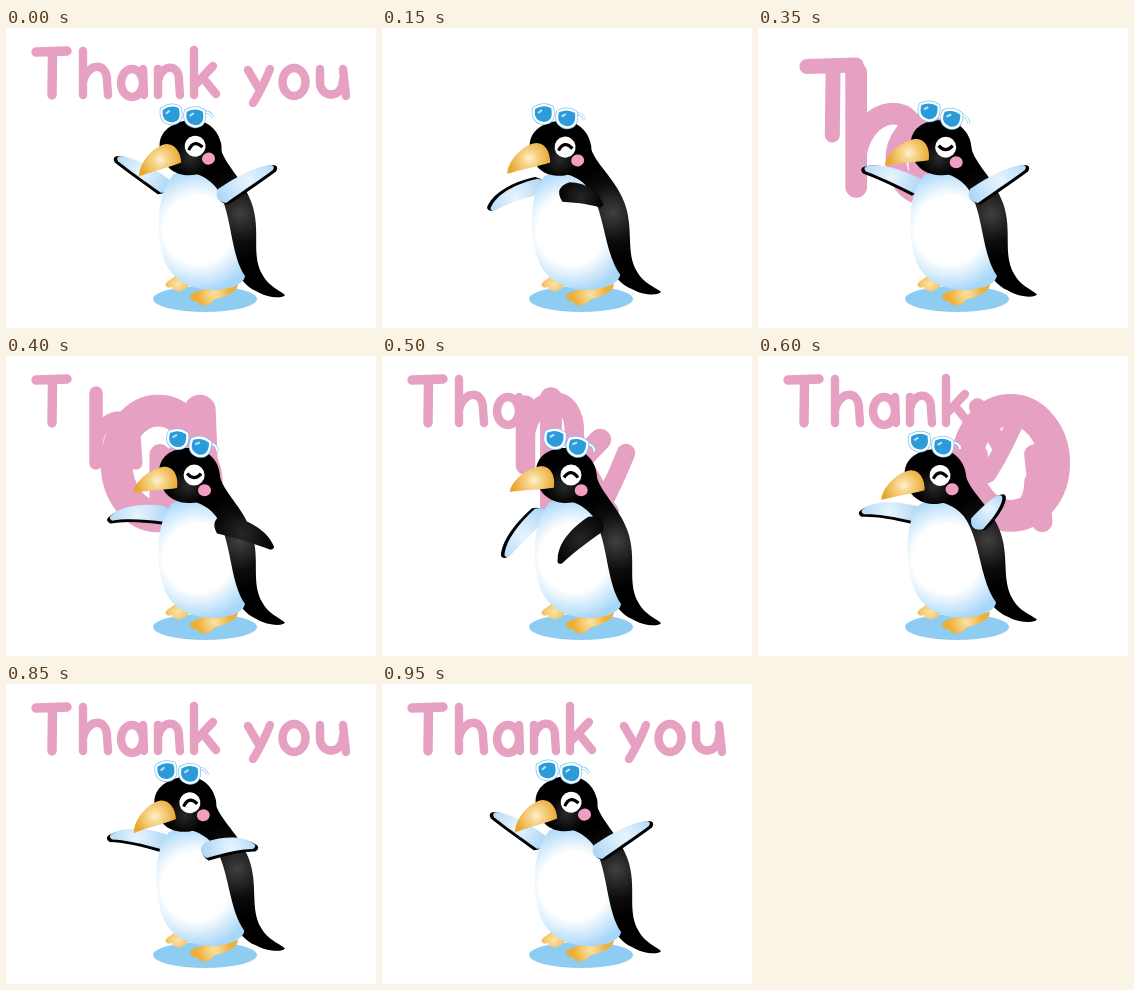
These frames come from a looping animation (370x300 px, 1000 ms). An HTML page with a canvas:

```html
<!DOCTYPE html>
<html lang="en">
<head>
<meta charset="utf-8">
<title>Thank you</title>
<style>
html, body { margin: 0; width: 100%; height: 100%; overflow: hidden; background: #fff; }
canvas { display: block; }
</style>
</head>
<body>
<canvas width="370" height="300" role="img" aria-label="Thank you"></canvas>
<script>
const c = document.querySelector('canvas').getContext('2d');
const PINK = '#e5a0c2', BLACK = '#000';

// Hand-lettered strokes: path, centre x, centre y, height
const letters = [
  ['M30 24L61 23M46.5 24L46 67', 46, 45, 54],
  ['M77 23V67M77 54C80 36 101 32 101 53L102 67', 89, 45, 54],
  ['M137 55A11 14 0 1 1 115 55A11 14 0 1 1 137 55M137 41L138 67', 126, 55, 37],
  ['M152 41V67M152 53C155 36 174 34 173 54L174 67', 163, 54, 37],
  ['M188 22V67M207 38L190 56M197 50L210 66', 199, 45, 54],
  ['M242 42L253 61M264 41Q256 61 247 75', 253, 57, 42],
  ['M299.5 54A11.5 14 0 1 1 276.5 54A11.5 14 0 1 1 299.5 54', 288, 54, 37],
  ['M314 41V54C314 71 337 71 337 52M337 41L340 68', 327, 54, 37]
].map(([d, ...box]) => [new Path2D(d), ...box]);

// Letter flight: height, then the share of the way back towards the penguin
const flight = [[92, .57, .61], [140, .38, .42], [86, .19, .2]];

// Pose keys: frame, body tilt, head tilt, left wing angle, right wing x, y, angle, length
const poses = [
  [0, 0, -12, -31, 216, 168, -30, 60],
  [3, -2.3, -6, 25, 184, 164, 20, 40],
  [7, -.5, .5, -19, 216, 168, -30, 60],
  [10, 0, 1, 50, 214, 168, 134, 55],
  [12, -2.7, -3.5, -3, 219, 168, -49, 38],
  [15, -4, -8, 19, 184, 164, 20, 40],
  [19, 0, -12, -31, 216, 168, -30, 60]
];

function poseAt(f) {
  const i = Math.max(1, poses.findIndex(p => p[0] >= f));
  const a = poses[i - 1], b = poses[i], t = (f - a[0]) / (b[0] - a[0]);
  return a.map((v, k) => v + (b[k] - v) * t).slice(1);
}

function glow(x, y, r, ...stops) {
  const g = c.createRadialGradient(x, y, 0, x, y, r);
  stops.forEach(([at, col]) => g.addColorStop(at, col));
  return g;
}

function fill(d, style) {
  c.fillStyle = style;
  c.fill(new Path2D(d));
}

function line(d, style, width) {
  c.strokeStyle = style;
  c.lineWidth = width;
  c.stroke(new Path2D(d));
}

function oval(x, y, rx, ry, style) {
  c.beginPath();
  c.ellipse(x, y, rx, ry, 0, 0, 7);
  c.fillStyle = style;
  c.fill();
}

function group(draw) {
  c.save();
  draw();
  c.restore();
}

function turn(x, y, deg) {
  c.translate(x, y);
  c.rotate(deg * Math.PI / 180);
  c.translate(-x, -y);
}

function drawText(f) {
  letters.forEach(([path, x, y, h], i) => {
    const n = f === 0 ? flight.length : f - 5 - i;
    if (n < 0) return;
    const [size, u, v] = flight[n] || [h, 0, 0];
    group(() => {
      c.translate(x + (195 - x) * u, y + (180 - y) * v);
      c.scale(size / h, size / h);
      c.translate(-x, -y);
      c.lineCap = 'round';
      c.strokeStyle = PINK;
      c.lineWidth = i ? 8.4 : 9.4;
      c.stroke(path);
    });
  });
}

function wing(x, y, deg, len, flip, dark) {
  const w = dark ? 10.5 : 8, tip = len - 3;
  const b = -5 * Math.cos((deg - 15) * Math.PI / 120); // arched most when level
  const blade = `M0 ${-w}C${len * .4} ${b - w} ${len * .75} ${b - w * .8} ${tip} -3Q${len + 2} 0 ${tip} 3` +
    `C${len * .75} ${b + w * .8} ${len * .4} ${b + w} 0 ${w}Q${-w * 1.3} 0 0 ${-w}`;
  group(() => {
    c.translate(x, y);
    c.scale(flip, 1);
    c.rotate(deg * Math.PI / 180);
    if (dark) return fill(blade, glow(len * .4, 0, len * .6, [0, '#262626'], [1, BLACK]));
    group(() => {
      c.translate(2, deg < 5 ? 2 : -2);
      fill(blade, BLACK);
      line(blade, BLACK, 1.5);
    });
    fill(blade, glow(len * .5, 0, len * .6, [0, '#e9f5fe'], [1, '#a9d5f5']));
  });
}

function foot(d, x, y) {
  fill(d, glow(x, y, 17, [0, '#fce3a6'], [1, '#eeaf36']));
}

function lens(x, y, deg) {
  group(() => {
    turn(x, y, deg);
    const d = `M${x - 8} ${y - 5}Q${x} ${y - 10} ${x + 8} ${y - 6}Q${x + 11} ${y + 7} ${x + 1} ${y + 8}Q${x - 10} ${y + 7} ${x - 8} ${y - 5}Z`;
    line(d, '#7cc4ee', 6);
    line(d, '#fff', 4.5);
    fill(d, '#2b9bd9');
    line(`M${x - 5} ${y - 1}L${x - 1} ${y - 4}`, '#bfe3f8', 2);
  });
}

function drawHead(f) {
  fill('M154 118C153 101 166 92 184 92C204 92 215 106 215 122C214 140 200 147 183 147C167 146 155 137 154 118Z',
    glow(182, 130, 32, [0, '#2a2a2a'], [.6, BLACK], [1, BLACK]));
  fill('M157 111C168 109 174 120 172 132C160 134 140 135 128 137C130 125 145 113 157 111Z',
    glow(152, 125, 24, [0, '#fff1cf'], [.3, '#f7d58c'], [.9, '#e9a62c']));
  oval(189, 119, 10.5, 10.5, '#fff');
  line(f > 5 && f < 9 ? 'M182 117.5Q189 125.5 196 117.5' : 'M182 121.5Q189 111.5 196 121.5', BLACK, 3.2);
  oval(199.5, 134, 6.5, 6, '#f29dc2');
  line('M203 87Q212 88 212 95', '#7cc4ee', 3);
  line('M203 87Q212 88 212 95', '#fff', 1.8);
  lens(172, 83, 8);
  lens(194.5, 90.5, 14);
}

function drawPenguin(f) {
  const [body, head, left, rx, ry, right, len] = poseAt(f);
  oval(199, 271, 52, 13, '#8fccf1');
  foot('M172 246C165 252 158 254 160 258Q162 261 166 259Q168 264 174 263C180 262 182 257 188 254Z', 172, 256);
  foot('M232 256C232 264 220 268 208 272Q203 279 195 277Q191 276 192 274Q184 273 184 268C186 263 200 262 205 258Z', 208, 266);
  wing(159, 158, left, 56, -1, false);
  group(() => {
    turn(200, 268, body);
    fill('M190 130L214 118C218 137 237 150 246 176C255 203 245 226 256 246C262 258 272 261 279 267C277 271 261 270 250 263C230 255 216 220 190 150Z',
      glow(234, 186, 48, [0, '#404040'], [.6, '#0c0c0c'], [1, BLACK]));
    fill('M167 147C151 165 150 201 157 228C163 251 185 262 206 262C225 262 238 256 239 248C225 227 226 192 215 168C207 148 180 139 167 147Z',
      glow(192, 202, 62, [0, '#fff'], [.55, '#fff'], [1, '#a6d6f8']));
    turn(185, 118, head);
    drawHead(f);
  });
  wing(rx, ry, right, len, 1, right > 0);
}

function tick(now) {
  const f = Math.floor(now % 1000 / 50);
  c.fillStyle = '#fff';
  c.fillRect(0, 0, 370, 300);
  c.lineJoin = 'round';
  drawText(f);
  drawPenguin(f);
  requestAnimationFrame(tick);
}
requestAnimationFrame(tick);
</script>
</body>
</html>
```
